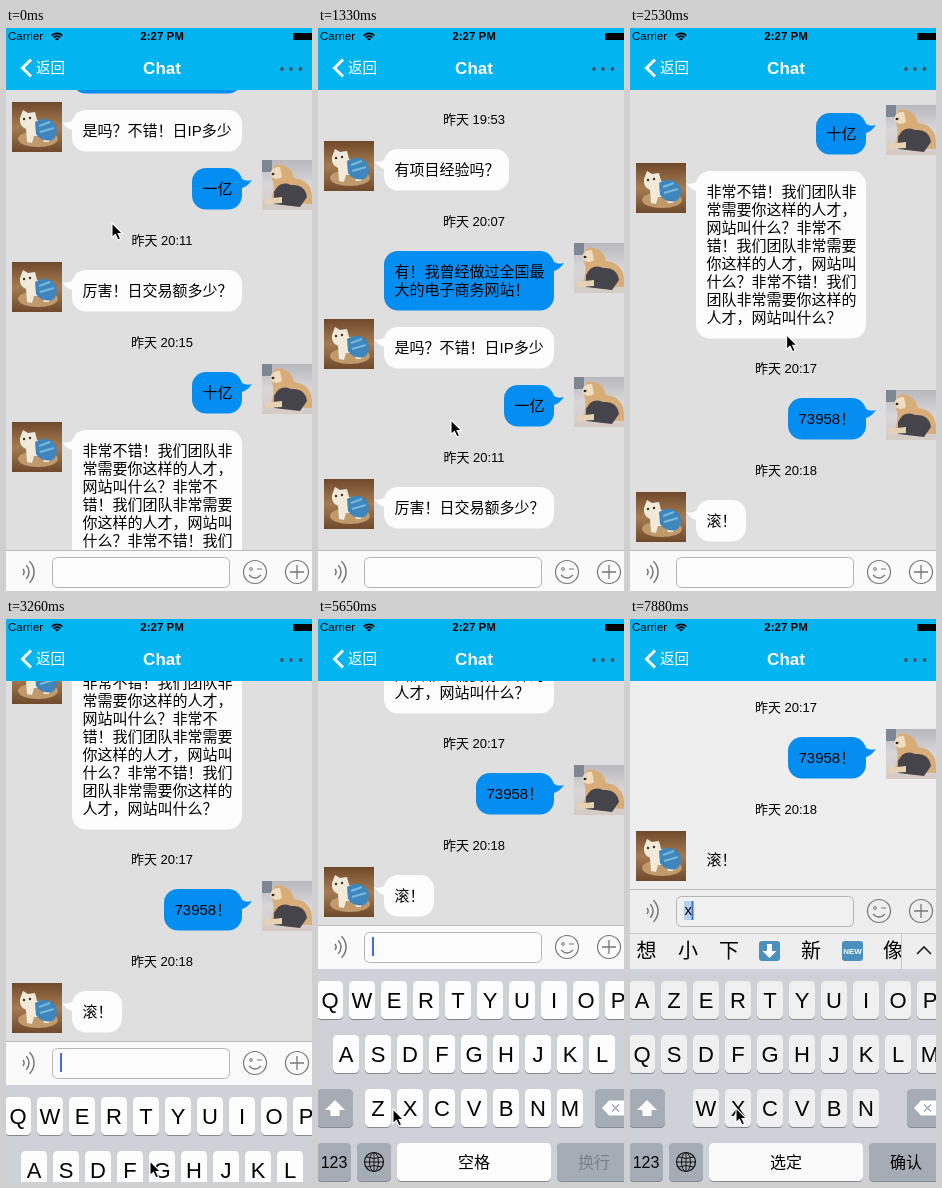
An HTML page with a canvas for the animation above (8 s loop, 306x563 px).

```html
<!DOCTYPE html>
<html lang="zh-CN">
<head>
<meta charset="utf-8">
<style>
html, body { margin: 0; width: 306px; height: 563px; overflow: hidden; background: #dfdfdf; }
canvas { display: block; width: 306px; height: 563px; }
</style>
</head>
<body>
<canvas id="stage"></canvas>
<script>
const W = 306, H = 563, LOOP = 8000, STEP = 148.6;
const FONT = '"Liberation Sans", "Noto Sans CJK SC", "Noto Sans CJK", sans-serif';
const canvas = document.getElementById('stage');
const c = canvas.getContext('2d');
const dpr = window.devicePixelRatio || 1;
canvas.width = W * dpr;
canvas.height = H * dpr;

// Tracks: [step, value, ...], one step being a screen update
const EXTRA = [[0, 259], [1, 215], [3, 20], [5, -53], [6, -10], [7, 190], [8, 400], [9, 476],
  [10, 435], [11, 220], [12, 10], [13, -46], [14, -18], [15, 0]];
const BAR = [[21, 522], [22, 422], [23, 345], [24, 306], [45, 306], [46, 284], [47, 270]];
const POINTER = [[0, 106, 195], [5, 117, 317], [9, 133, 392], [13, 168, 98], [15, 165, 150],
  [20, 144, 542], [23, 144, 542], [28, 107, 539], [34, 52, 535], [36, 52, 535],
  [38, 75, 490], [42, 93, 491], [47, 96, 490], [53, 106, 489]];
const TYPED = 45, RELAYOUT = 41;

// Chat items: y is the avatar top, or the text centre of a time stamp
const CHAT = [
  { y: -126, time: '19:53' },
  { y: -104, w: 125, text: ['有项目经验吗？'] },
  { y: -24, time: '20:07' },
  { y: -2, w: 170, mine: true, text: ['有！我曾经做过全国最', '大的电子商务网站！'] },
  { y: 74, w: 170, text: ['是吗？不错！日IP多少'] },
  { y: 132, w: 50, mine: true, text: ['一亿'] },
  { y: 212, time: '20:11' },
  { y: 234, w: 170, text: ['厉害！日交易额多少？'] },
  { y: 314, time: '20:15' },
  { y: 336, w: 50, mine: true, text: ['十亿'] },
  { y: 394, w: 170, text: ['非常不错！我们团队非', '常需要你这样的人才，', '网站叫什么？非常不',
    '错！我们团队非常需要', '你这样的人才，网站叫', '什么？非常不错！我们', '团队非常需要你这样的', '人才，网站叫什么？'] },
  { y: 599, time: '20:17' },
  { y: 621, w: 78, mine: true, text: ['73958！'] },
  { y: 701, time: '20:18' },
  { y: 723, w: 50, text: ['滚！'] }
];

function track(keys, s, i = 1) {
  if (s <= keys[0][0]) return keys[0][i];
  for (let k = 1; k < keys.length; k++) {
    const a = keys[k - 1], b = keys[k];
    if (s <= b[0]) return a[i] + (b[i] - a[i]) * (s - a[0]) / (b[0] - a[0]);
  }
  return keys[keys.length - 1][i];
}

function rect(x, y, w, h, fill) {
  c.fillStyle = fill;
  c.fillRect(x, y, w, h);
}

function round(x, y, w, h, r, fill, stroke) {
  c.beginPath();
  c.roundRect(x, y, w, h, r);
  paint(fill, stroke);
}

function paint(fill, stroke, width = 1) {
  if (fill) { c.fillStyle = fill; c.fill(); }
  if (stroke) { c.strokeStyle = stroke; c.lineWidth = width; c.stroke(); }
}

function path(d, fill, stroke, width = 1) {
  const p = new Path2D(d);
  if (fill) { c.fillStyle = fill; c.fill(p); }
  if (stroke) { c.strokeStyle = stroke; c.lineWidth = width; c.stroke(p); }
}

function disc(x, y, rx, ry, fill, stroke, width) {
  c.beginPath();
  c.ellipse(x, y, rx, ry, 0, 0, 7);
  paint(fill, stroke, width);
}

// Text with its visual middle at cy
function label(str, x, cy, size, { color = '#000', align = 'center', weight = 400 } = {}) {
  c.font = `${weight} ${size}px ${FONT}`;
  c.textAlign = align;
  c.fillStyle = color;
  c.fillText(str, x, cy + size * 0.36);
}

function at(x, y, draw) {
  c.save();
  c.translate(x, y);
  draw();
  c.restore();
}

function avatar(mine) {
  c.beginPath();
  c.rect(0, 0, 50, 50);
  c.clip();
  const g = c.createLinearGradient(0, 0, 0, 50);
  if (mine) {
    g.addColorStop(0, '#b9b8bd');
    g.addColorStop(0.5, '#d8d6d8');
    g.addColorStop(1, '#d5cbc5');
    rect(0, 0, 50, 50, g);
    rect(0, 0, 10, 12, '#7e8794');
    path('M9 12 Q12 2 20 5 Q30 7 32 18 Q48 20 50 35 L50 44 L8 42 Q14 28 10 18Z', '#d9ad78');
    path('M8 14 Q10 6 18 7 L20 17 Q12 22 8 14Z', '#f0dcc0');
    path('M12 32 Q18 20 29 25 Q43 24 45 37 L38 47 L12 44Z', '#45444a');
    path('M2 39 L20 37 L20 43 L4 44Z', '#e8d2b4');
    disc(11, 14, 1.5, 1.3, '#33291f');
  } else {
    g.addColorStop(0, '#70492b');
    g.addColorStop(0.5, '#a47b51');
    g.addColorStop(1, '#6f4a2c');
    rect(0, 0, 50, 50, g);
    disc(26, 37, 20, 8, '#c19a6c');
    path('M8 16 L11 8 L16 11 L23 10 L25 18 Q36 19 39 29 L37 40 L32 40 L30 34 L22 34 L20 41 L15 40 L14 27 Q7 24 8 16Z', '#f1e9da');
    path('M23 20 Q35 12 44 23 Q47 34 40 38 Q29 40 24 32Z', '#3f86bd');
    path('M27 24 L38 20 M28 30 L42 26', null, '#79b9d9', 2);
    disc(12, 17, 1.2, 1.2, '#3c2c20');
    disc(18, 16, 1.2, 1.2, '#3c2c20');
  }
}

function message(m, y, bubble) {
  at(m.mine ? 256 : 6, y, () => avatar(m.mine));
  const top = y + 8, h = 23.5 + 18 * m.text.length;
  const x = m.mine ? 236 - m.w : 66;
  const fill = m.mine ? '#058ef2' : bubble;
  round(x, top, m.w, h, 14, fill);
  const tail = 'M-1 10 Q3 14 10 12 Q4 20 -1 20Z';
  c.save();
  c.translate(m.mine ? 236 : 66, top);
  if (!m.mine) c.scale(-1, 1);
  path(tail, fill);
  c.restore();
  m.text.forEach((line, i) => label(line, x + 10.5, top + 21 + 18 * i, 15, { align: 'left' }));
}

function header() {
  rect(0, 0, W, 62, '#02b4f0');
  label('Carrier', 2, 8, 11.5, { align: 'left' });
  for (const r of [2, 4.8, 7.6]) {
    c.beginPath();
    c.arc(51, 13, r, -2.35, -0.8);
    paint(null, '#000', 1.8);
  }
  label('2:27 PM', 156, 8, 11.5, { weight: 700 });
  rect(287, 5, 19, 7, '#000');
  path('M25 31.5 L16.5 40 L25 48.5', null, '#fff', 3);
  label('返回', 30, 40, 14.5, { align: 'left', color: '#fff' });
  label('Chat', 156, 40, 17, { weight: 700, color: '#fff' });
  for (const x of [276, 285, 294.5]) disc(x, 41, 1.9, 1.9, '#3d5663');
}

function inputBar(y, s, pale) {
  rect(0, y, W, 44, pale ? '#eee' : '#fafafa');
  rect(0, y, W, 1, '#b9babc');
  at(0, y, () => {
    const ink = '#777';
    for (const [r, a] of [[5, 0.65], [10, 0.75], [15, 0.8]]) {
      c.beginPath();
      c.arc(13, 22, r, -a, a);
      paint(null, ink, 1.5);
    }
    round(46.5, 7.5, 177, 30, 5, pale ? '#f0f0f0' : '#fcfcfc', '#b5b5b5');
    disc(249, 22, 11.5, 11.5, null, ink, 1.2);
    disc(245, 19, 1.4, 1.4, null, ink, 1);
    path('M251 19 H256 M243 25 Q249 31 255 25', null, ink, 1.2);
    disc(291, 22, 11.5, 11.5, null, ink, 1.2);
    path('M284 22 H298 M291 15 V29', null, ink, 1.3);
    if (s < 22) return;
    const typed = s >= TYPED;
    if (typed) {
      rect(54, 12, 9, 19, '#b4d2f4');
      label('x', 54.5, 21, 15, { align: 'left' });
    }
    if ((s - 22) % 7 < 5) rect(typed ? 61.5 : 54, 12, 2, 19, '#416de0');
  });
}

function key(x, y, w, text, { fill = '#fff', size = 22, color = '#000' } = {}) {
  round(x, y + 1, w, 38, 4.5, '#858a91');
  round(x, y, w, 38, 4.5, fill);
  if (text) label(text, x + w / 2, y + 19.5, size, { color });
}

function keyboard(y, s, pale) {
  rect(0, y, W, H - y, '#ced2d8');
  const fill = pale ? '#f0f0f0' : '#fdfdfd', dark = '#a5acb6';
  const french = s >= RELAYOUT;
  const rows = french
    ? [['AZERTYUIOP', 12], ['QSDFGHJKLM', 12], ['WXCVBN', 76]]
    : [['QWERTYUIOP', 12], ['ASDFGHJKL', 28], ['ZXCVBNM', 60]];
  at(0, y, () => {
    rows.forEach(([letters, x], r) =>
      [...letters].forEach((ch, i) => key(x - 13 + 32 * i, 12 + 54 * r, 26, ch, { fill })));
    key(-1, 120, 36, '', { fill: dark });
    path('M17 131 L27 141 H21.5 V147 H12.5 V141 H7Z', '#fff');
    key(277, 120, 36, '', { fill: dark });
    path('M284 139 L291 131.5 H306 V146.5 H291Z', '#fff');
    path('M294 135.5 L301 142.5 M301 135.5 L294 142.5', null, dark, 1.6);
    key(-1, 174, 34, '123', { fill: dark, size: 16 });
    key(39, 174, 34, '', { fill: dark });
    disc(56, 193, 9.5, 9.5, null, '#111', 1.2);
    disc(56, 193, 4.5, 9.5, null, '#111', 1);
    path('M46.5 193 H65.5 M56 183.5 V202.5 M48.5 188 Q56 191 63.5 188 M48.5 198 Q56 195 63.5 198', null, '#111', 1);
    const typed = s >= TYPED;
    key(79, 174, 154, typed ? '选定' : '空格', { fill: pale ? '#fafafa' : fill, size: 16 });
    key(239, 174, 74, typed ? '确认' : '换行', { fill: dark, size: 16, color: typed ? '#000' : '#7a818b' });
  });
}

function candidates(y) {
  rect(0, y, W, 36, '#eee');
  rect(0, y, W, 1, '#c4c6c9');
  at(0, y, () => {
    for (const [ch, x] of [['想', 16.5], ['小', 58], ['下', 99], ['新', 181], ['像', 263]]) label(ch, x, 17.5, 20);
    for (const x of [129, 212]) round(x, 8, 21, 20, 3, '#4b8fbd');
    path('M137 11 H142 V18 H146.5 L139.5 25 L132.5 18 H137Z', '#fff');
    label('NEW', 222.5, 18, 8, { color: '#fff', weight: 700 });
    rect(272, 1, 34, 35, '#eee');
    rect(271, 1, 1, 35, '#c4c6c9');
    path('M287 21 L294 14 L301 21', null, '#222', 1.6);
  });
}

function pointer(x, y) {
  at(x, y, () => path('M0 0 V14.5 L3.4 11.4 L6 17 L8.6 15.8 L6.1 10.5 H10.5Z', '#000', '#fff', 1.1));
}

function draw(now) {
  const s = Math.floor((now % LOOP + 12) / STEP);
  const pale = s >= TYPED;
  const bar = track(BAR, s);
  const shift = bar - 781 + track(EXTRA, s);
  c.setTransform(dpr, 0, 0, dpr, 0, 0);
  rect(0, 0, W, H, pale ? '#eee' : '#dfdfdf');
  for (const m of CHAT) {
    const y = m.y + shift;
    if (m.time) label('昨天 ' + m.time, 156, y, 13);
    else message(m, y, pale ? '#eee' : '#fdfdfd');
  }
  header();
  if (bar < 522) keyboard(Math.max(350, bar + 44), s, pale);
  if (bar < 306) candidates(bar + 44);
  if (bar < 306) keyboard(350, s, pale);
  inputBar(bar, s, pale);
  pointer(track(POINTER, s, 1), track(POINTER, s, 2));
}

let start;
function tick(now) {
  start ??= now;
  draw(now - start);
  requestAnimationFrame(tick);
}
draw(0);
requestAnimationFrame(tick);
</script>
</body>
</html>
```
